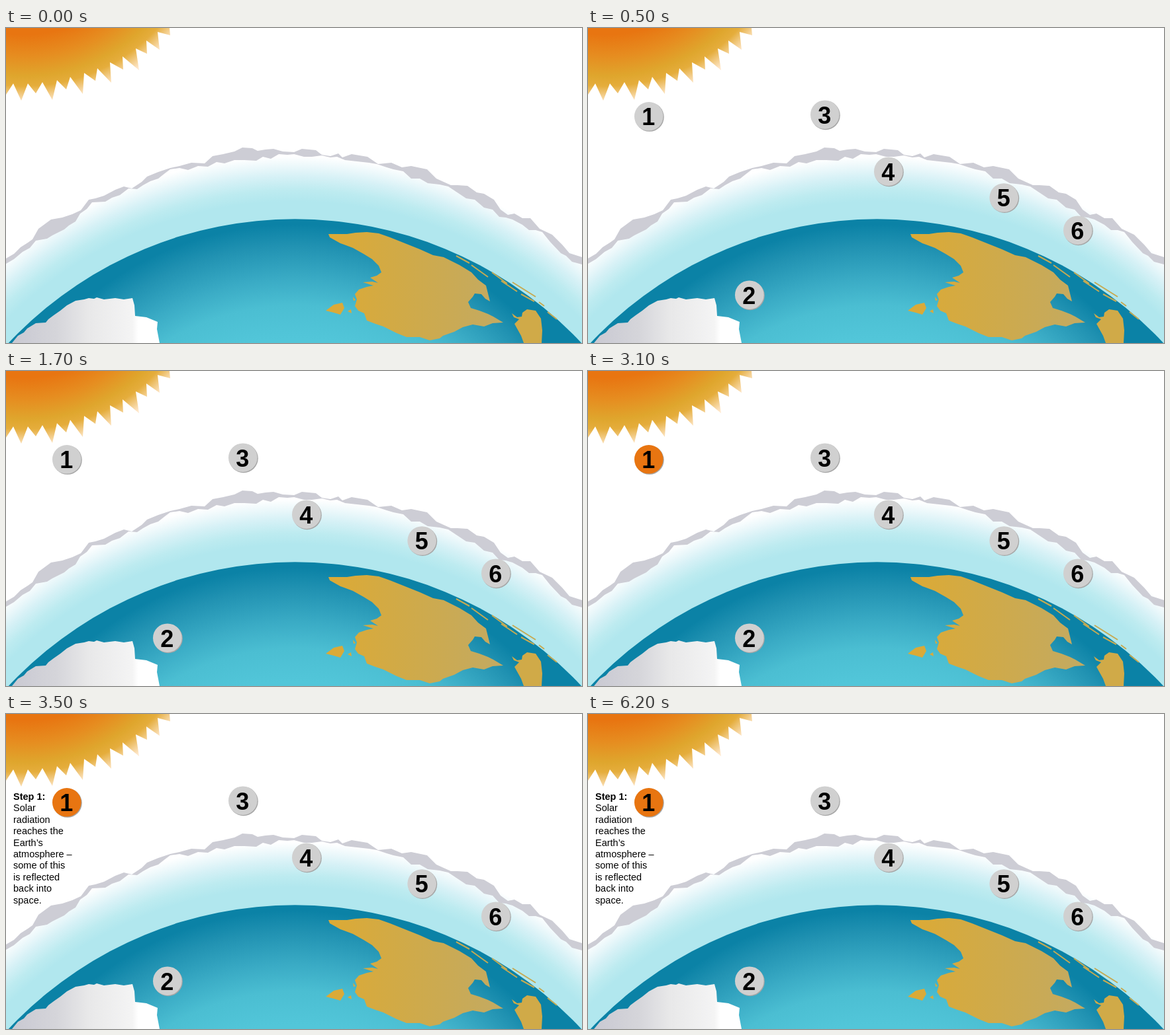
Write an HTML page that moves like this. It is 870 px wide and 477 px high and loops after 8000 ms.

```html
<!DOCTYPE html>
<html lang="en">
<head>
<meta charset="utf-8">
<title>Greenhouse effect, step 1</title>
<style>
  html, body { margin: 0; width: 100%; height: 100%; overflow: hidden; background: #fff; }
  svg { display: block; width: 100%; height: 100%; }
  text { font-family: "Liberation Sans", Arial, sans-serif; fill: #000; }
  .digit { font-size: 36px; font-weight: bold; text-anchor: middle; }
  .caption { font-size: 14.5px; }
</style>
</head>
<body>
<svg viewBox="0 0 870 477">
  <defs>
    <radialGradient id="sunFill" gradientUnits="userSpaceOnUse" cx="28" cy="-185" r="300">
      <stop offset=".65" stop-color="#e87511"/>
      <stop offset=".76" stop-color="#e68d20"/>
      <stop offset=".86" stop-color="#dfa62d"/>
      <stop offset=".91" stop-color="#e5ad3c"/>
      <stop offset="1" stop-color="#ffe9cf"/>
    </radialGradient>
    <radialGradient id="airFill" gradientUnits="userSpaceOnUse" cx="435" cy="878" r="684">
      <stop offset=".9" stop-color="#b1e7ee"/>
      <stop offset=".925" stop-color="#bdebf0"/>
      <stop offset=".955" stop-color="#d6f1f6"/>
      <stop offset=".975" stop-color="#e9f7fa"/>
      <stop offset="1" stop-color="#fff"/>
    </radialGradient>
    <radialGradient id="seaFill" gradientUnits="userSpaceOnUse" cx="435" cy="790" r="500">
      <stop offset=".64" stop-color="#52c6d9"/>
      <stop offset=".74" stop-color="#4bbed2"/>
      <stop offset=".82" stop-color="#3aabc5"/>
      <stop offset=".92" stop-color="#2192b2"/>
      <stop offset=".985" stop-color="#0b82a6"/>
    </radialGradient>
    <linearGradient id="iceFill" gradientUnits="userSpaceOnUse" x1="10" x2="200" y1="0" y2="0">
      <stop offset="0" stop-color="#c9c9d2"/>
      <stop offset=".35" stop-color="#d5d5da"/>
      <stop offset=".6" stop-color="#e8e8e9"/>
      <stop offset=".95" stop-color="#f4f4f4"/>
      <stop offset="1" stop-color="#fff"/>
    </linearGradient>
    <linearGradient id="landFill" gradientUnits="userSpaceOnUse" x1="487" x2="740" y1="0" y2="0">
      <stop offset="0" stop-color="#dcaa35"/>
      <stop offset=".45" stop-color="#d0aa48"/>
      <stop offset="1" stop-color="#c4aa60"/>
    </linearGradient>
  </defs>

  <path id="sun" fill="url(#sunFill)" d="M0 0V101L11 84 23 110 33 84 45 99 55 82 70 109 77 79 91 93 97 74 116 100 118 68 135 80 138 61 159 83 157 52 177 63 176 43 201 64 196 31 213 39 212 19 232 33 229 6 248 11 247 0Z"/>

  <circle cx="435" cy="878" r="684" fill="url(#airFill)"/>
  <g id="clouds" fill="#cdcdd5">
    <path d="M0 349 12 342 22 332 33 325 40 320 49 304 68 290 85 287 100 282 113 276 125 260 135 258 148 254 165 245 178 240 190 243 205 233 213 225 230 218 248 212 262 209 280 204 300 205 312 194 328 191 345 187 357 181 372 182 380 186 392 184 404 183 418 187 436 188V191L425 192 412 191 400 198 388 195 378 201 360 200 345 200 330 205 318 203 305 210 290 209 275 215 262 212 248 214 240 220 230 228 218 232 207 238 198 244 185 243 172 253 160 257 150 263 130 264 122 274 112 281 105 293 95 299 88 305 70 314 62 319 45 322 36 333 25 339 12 350 0 357Z"/>
    <path d="M435 188 447 183 468 185 477 192 490 194 502 190 508 196 522 191 546 195 562 206 582 204 598 211 612 209 636 214 650 228 672 238 682 238 697 239 711 249 722 251 737 260 747 275 758 283 768 281 780 288 792 288 806 304 825 313 840 328 851 341 870 347V358L855 354 846 345 838 341 822 324 810 309 800 306 790 306 780 298 765 290 755 287 745 286 735 275 722 272 708 260 695 258 680 248 668 240 655 237 637 235 625 228 612 228 600 217 585 214 575 211 560 206 548 204 530 202 512 200 500 195 490 196 477 193 462 195 450 195 435 191Z"/>
  </g>

  <circle cx="436.5" cy="881.8" r="592.5" fill="url(#seaFill)"/>
  <path id="ice" fill="url(#iceFill)" d="M9 477 18 466 27 461 32 455 45 447 60 446 64 441 72 435 82 428 92 420 105 413 118 411 125 409 133 410 137 408 148 411 165 409 178 411 191 409 194 420 195 436 212 438 229 445 228 456 232 477Z"/>
  <g id="land" fill="url(#landFill)">
    <path d="M487 312 515 312 528 310 545 309 563 311 580 317 600 325 625 335 645 344 661 347 685 359 703 370 713 381 725 390 728 402 731 414 724 410 718 403 708 402 705 407 698 415 702 424 715 428 728 433 736 437 751 446 735 447 722 452 705 449 690 453 677 460 660 466 655 470 640 473 625 468 605 468 590 462 570 452 558 448 545 443 541 432 532 428 527 421 530 411 527 403 533 396 545 392 555 390 539 385 553 384 562 386 550 378 560 375 567 370 563 360 553 350 540 342 524 333 505 326 489 317Z"/>
    <path d="M483 428 495 419 508 416 511 424 505 434 495 431ZM516 429 521 426 522 432ZM524 407 528 412 525 413Z"/>
    <path fill="#d0aa48" d="M764 432 772 438 779 437 780 431 787 426 800 428 808 440 810 458 809 477H782L778 466 768 448 775 441 767 438Z"/>
    <path fill="none" stroke="#c6aa52" stroke-width="2" d="M680 345 700 356M703 359 728 377M734 370 757 387M748 383 772 399M765 385 800 407M778 403 798 414M805 415 813 421M818 430 832 441"/>
  </g>

  <g id="badges"></g>
  <g id="caption" class="caption"></g>
</svg>
<script>
const LOOP = 8000;
const byId = id => document.getElementById(id);
const badges = byId("badges"), caption = byId("caption");

const centers = [[91.8, 133.8], [243.8, 404.2], [357.8, 131.2], [453.8, 217.2], [628.2, 257], [739.8, 306.2]];
badges.innerHTML = centers.map(([x, y], i) => `
  <circle cx="${x + 1}" cy="${y + 1}" r="22" fill="#a6a6a6"/>
  <circle class="disc" cx="${x}" cy="${y}" r="21.8" fill="#d0d0d0"/>
  <text class="digit" x="${x - .5}" y="${y + 13.3}">${i + 1}</text>`).join("");

const lines = ["Step 1:", "Solar", "radiation", "reaches the", "Earth’s", "atmosphere –",
  "some of this", "is reflected", "back into", "space."];
caption.innerHTML = lines.map((line, i) =>
  `<text x="11" y="${129.7 + i * 17.45}"${i ? "" : ' font-weight="bold"'}>${line}</text>`).join("");

const firstDisc = badges.querySelector(".disc");
const show = (node, on) => node.setAttribute("visibility", on ? "visible" : "hidden");

function draw() {
  const t = performance.now() % LOOP;
  show(badges, t >= 500);
  firstDisc.setAttribute("fill", t >= 2500 ? "#e87511" : "#d0d0d0");
  show(caption, t >= 3500);
  requestAnimationFrame(draw);
}
draw();
</script>
</body>
</html>
```
